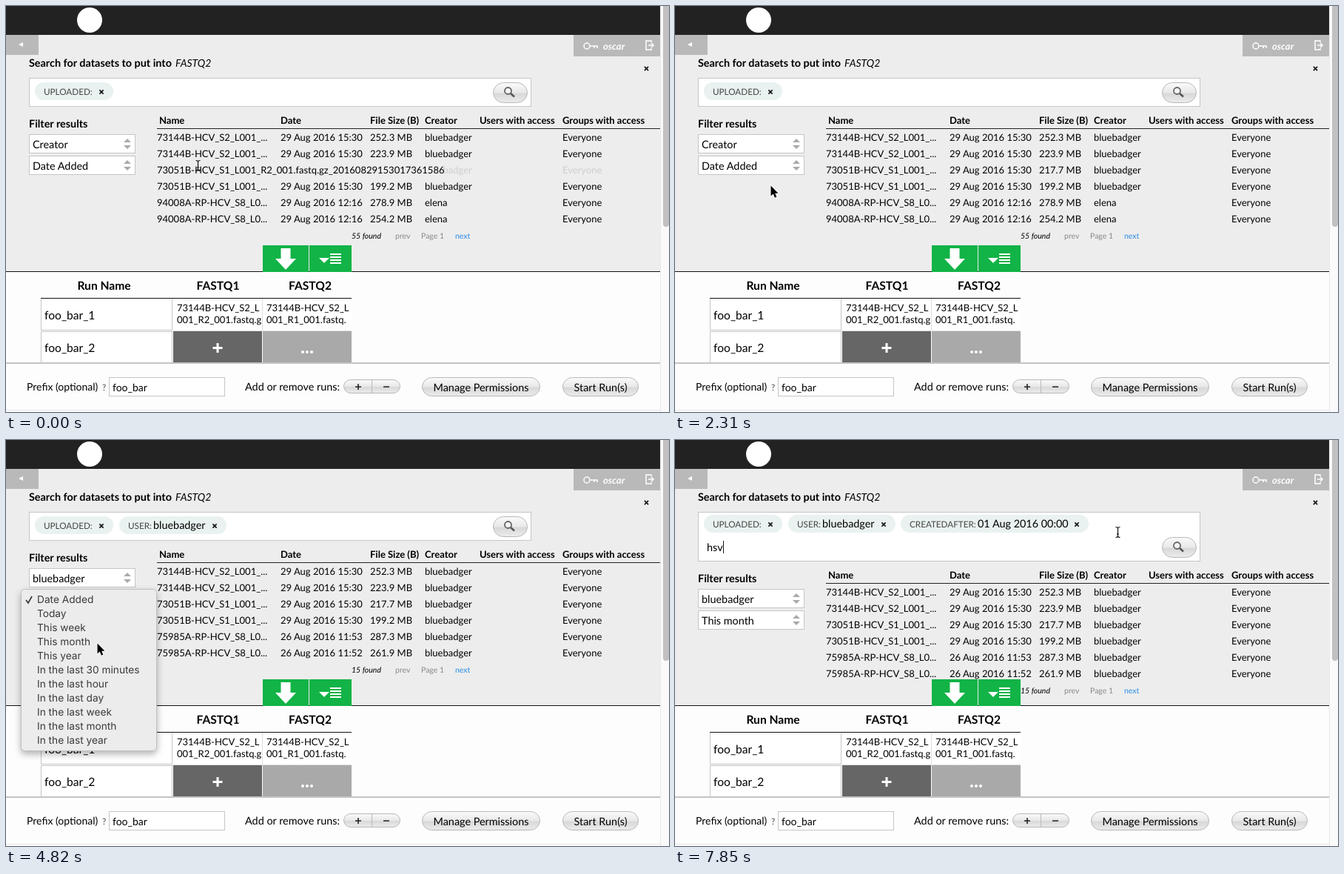
An HTML page that plays this animation: 896 by 548 pixels, repeating every 8 s.

```html
<!DOCTYPE html>
<html lang="en">
<head>
<meta charset="utf-8">
<title>Dataset search</title>
<style>
html, body { margin: 0; width: 100%; height: 100%; overflow: hidden; background: #fdfdfd; }
svg { display: block; position: absolute; left: 0; top: 0; }
text { font-family: Lato, sans-serif; font-size: 13px; white-space: pre; text-rendering: geometricPrecision; }
.mid { font-size: 14.4px; }
.big { font-size: 15.6px; }
.bold { font-weight: 700; }
.it { font-style: italic; }
.input { font-size: 14px; }
.tag { font-size: 11.7px; fill: #444; }
.small { font-size: 10.5px; }
.gray { fill: #888; }
.white { fill: #fff; }
.center { text-anchor: middle; }
.menu text { font-family: Inter, sans-serif; font-size: 13.7px; fill: #3a3a3a; }
.menu text.on { fill: #fff; }
.menu > rect:first-child { filter: drop-shadow(0 4px 5px rgba(0, 0, 0, .3)); }
</style>
</head>
<body>
<svg width="896" height="548" viewBox="0 0 896 548">
  <defs>
    <linearGradient id="pill" x2="0" y2="1">
      <stop stop-color="#fafafa"/><stop offset=".5" stop-color="#e8e8e8"/>
      <stop offset=".55" stop-color="#d8d8d8"/><stop offset="1" stop-color="#ececec"/>
    </linearGradient>
  </defs>
  <g id="scene"></g>
  <g id="cursor">
    <path id="arrow" d="M0 0V14L3.2 11 5.4 16.2 7.8 15.2 5.7 10.2H10Z" stroke="#fff" stroke-width="1.8" paint-order="stroke"/>
    <path id="beam" d="M-3-7Q0-7 0-5Q0-7 3-7M0-5V5M-3 7Q0 7 0 5Q0 7 3 7M-1.5 2.5H1.5" fill="none" stroke="#111" stroke-width="1.2"/>
  </g>
</svg>
<script>
const LOOP = 8000, PANEL = '#ededed';
const USER = 'bluebadger', OTHER = 'elena';
const byId = id => document.getElementById(id);

const text = (x, y, s, cls = '', more = '') => `<text x="${x}" y="${y}" class="${cls}" ${more}>${s}</text>`;
const rect = (x, y, w, h, fill, more = '') => `<rect x="${x}" y="${y}" width="${w}" height="${h}" fill="${fill}" ${more}/>`;
const path = (d, fill, more = '') => `<path d="${d}" fill="${fill}" ${more}/>`;
const field = (x, y, w, h) => rect(x + .5, y + .5, w - 1, h - 1, '#fff', 'stroke="#c6c6c6"');
const pill = (x, y, w, h) => rect(x + .5, y + .5, w - 1, h - 1, 'url(#pill)', `rx="${h / 2}" stroke="#b8b8b8"`);
const cross = (x, y, r = 2.6) => path(`M${x - r} ${y - r}l${2 * r} ${2 * r}m0 ${-2 * r}l${-2 * r} ${2 * r}`, 'none', 'stroke="#111" stroke-width="1.6"');

const commonRows = [
  ['73144B-HCV_S2_L001_', 'R2_001.fastq.gz_20160829153027260734', '29 Aug 2016 15:30', '252.3 MB', USER],
  ['73144B-HCV_S2_L001_', 'R1_001.fastq.gz_20160829153027169461', '29 Aug 2016 15:30', '223.9 MB', USER],
  ['73051B-HCV_S1_L001_', 'R2_001.fastq.gz_20160829153017361586', '29 Aug 2016 15:30', '217.7 MB', USER],
  ['73051B-HCV_S1_L001_', 'R1_001.fastq.gz_20160829153017270812', '29 Aug 2016 15:30', '199.2 MB', USER]];
const allRows = [...commonRows,
  ['94008A-RP-HCV_S8_L0', '', '29 Aug 2016 12:16', '278.9 MB', OTHER],
  ['94008A-RP-HCV_S8_L0', '', '29 Aug 2016 12:16', '254.2 MB', OTHER]];
const userRows = [...commonRows,
  ['75985A-RP-HCV_S8_L0', '', '26 Aug 2016 11:53', '287.3 MB', USER],
  ['75985A-RP-HCV_S8_L0', '', '26 Aug 2016 11:52', '261.9 MB', USER]];

const creators = ['Creator', 'adela', 'bertil', USER, 'data_uploader', OTHER, 'oscar'];
const dates = ['Date Added', 'Today', 'This week', 'This month', 'This year',
  ...['30 minutes', 'hour', 'day', 'week', 'month', 'year'].map(s => 'In the last ' + s)];

// Pointer path: time, x, y
const route = [[0, 259, 215], [59.9, 259, 215], [60, 267, 219], [260, 267, 219], [500, 235, 200],
  [760, 185, 173], [1020, 130, 183], [1260, 130, 183], [1720, 129, 242], [2730, 129, 242],
  [2950, 118, 209], [3550, 118, 209], [4280, 123, 274], [5060, 123, 274], [5340, 338, 203],
  [5580, 517, 116], [5810, 583, 129], [6290, 583, 129], [6450, 603, 116], [6710, 598, 124], [LOOP, 598, 124]];

function pointer(t) {
  const i = Math.max(1, route.findIndex(p => p[0] > t));
  const [t0, x0, y0] = route[i - 1], [t1, x1, y1] = route[i];
  const k = Math.max(0, (t - t0) / (t1 - t0));
  return [x0 + (x1 - x0) * k, y0 + (y1 - y0) * k];
}

function header() {
  return rect(0, 0, 884, 39, '#222') + '<circle cx="113" cy="19" r="17" fill="#fff"/>' +
    rect(0, 39, 884, 319, PANEL) +
    rect(0, 39, 44, 27, '#b9b9b9') + path('M17 52l6-3v6Z', '#fff') +
    rect(767, 39, 117, 29, '#b9b9b9') +
    path('M789 54a4 4 0 1 0-8 0a4 4 0 1 0 8 0H799V57M795 54V57', 'none', 'stroke="#fff" stroke-width="1.5"') +
    text(807, 59, 'oscar', 'it bold white') +
    path('M872 49V47H865V59H872V57M868 53H875M872 50L875 53L872 56', 'none', 'stroke="#fff" stroke-width="1.5"') +
    text(31, 82, 'Search for datasets to put into', 'mid bold') +
    text(229, 82, 'FASTQ2', 'it input') + cross(865.5, 84.5);
}

function searchBox(s) {
  const y = s.wide ? 102 : 104;
  const tag = (x, w, label, value = '', valueX = 0) =>
    rect(x, y - 1, w, 24, '#e9f2f0', 'rx="12"') + text(x + 12, y + 16, label, 'tag') +
    text(valueX, y + 16, value, 'mid') + cross(x + w - 16, y + 12);
  return field(31, 97, 679, 39 + s.dy) + tag(39, 106, 'UPLOADED:') +
    (s.tagged ? tag(153, 145, 'USER:', USER, 199) : '') +
    (s.wide ? tag(305, 254, 'CREATEDAFTER:', '01 Aug 2016 00:00', 409) : '') +
    `<g transform="translate(0 ${s.dy})">` + pill(658, 103, 47, 28) +
    path('M682 118L687 122.5', 'none', 'stroke="#555" stroke-width="2.6"') +
    '<circle cx="678.5" cy="114.5" r="4.5" fill="#f4f4f4" stroke="#666" stroke-width="1.8"/></g>' +
    (s.typed ? text(43, 150, s.typed, 'mid') : '') +
    (s.caret ? rect(s.caret, 136, 1, 17, '#111') : '');
}

function select(y, value) {
  return field(31, y, 144, 26) + text(36, y + 19, value, 'mid') +
    path(`M159 ${y + 11}l5-5 5 5ZM159 ${y + 15}l5 5 5-5Z`, '#aaa');
}

function results(s) {
  const heads = [[207, 'Name'], [371, 'Date'], [492, 'File Size (B)'], [566, 'Creator'],
    [640, 'Users with access'], [752, 'Groups with access']];
  const row = ([name, rest, date, size, user], i) => {
    const y = 182 + 22 * i, open = i === s.hover;
    const cells = text(371, y, date) + text(492, y, size) + text(566, y, user) + text(752, y, 'Everyone');
    return `<g opacity="${open ? .13 : 1}">${cells}</g>` +
      (open ? rect(204, y - 15, 387, 21, PANEL) : '') + text(204, y, name + (open ? rest : '...'));
  };
  return `<g transform="translate(0 ${s.dy})">` +
    text(31, 164, 'Filter results', 'mid bold') +
    select(173, s.picked ? USER : 'Creator') + select(202, s.wide ? 'This month' : 'Date Added') +
    heads.map(([x, label]) => text(x, 159, label, 'bold')).join('') + rect(204, 165, 680, 1, '#222') +
    (s.filtered ? userRows : allRows).map(row).join('') +
    text(467, 314, (s.filtered ? 15 : 55) + ' found', 'small it') + text(526, 314, 'prev', 'small gray') +
    text(561, 314, 'Page 1', 'small gray') + text(607, 314, 'next', 'small', 'fill="#2a8ce6"') + '</g>';
}

function runs() {
  const line = 'stroke="#fff" stroke-width="2"';
  const file = (x, part, end) => text(x, 412, '73144B-HCV_S2_L') + text(x, 428, `001_${part}_001.fastq.${end}`);
  return rect(0, 359, 884, 189, '#fdfdfd') + rect(0, 358, 884, 1, '#111') +
    rect(347, 323, 62, 36, '#12b347') + rect(410, 323, 57, 36, '#12b347') +
    path('M371.5 327H384.5V341H392L378 356L364 341H371.5Z', '#fff') +
    path('M423 340H437L430 347Z', '#fff') + path('M438 335H453M438 339H453M438 343H453M438 347H453', 'none', line) +
    text(132.5, 383, 'Run Name', 'big bold center') + text(286.5, 383, 'FASTQ1', 'big bold center') +
    text(411, 383, 'FASTQ2', 'big bold center') +
    field(47, 394, 178, 44) + field(47, 439, 178, 44) +
    rect(225, 395, 242, 43, '#fff') + rect(346, 395, 1, 43, '#ddd') + rect(225, 438, 242, 1, '#ddd') +
    rect(47, 394, 420, 1, '#111') +
    text(52, 423, 'foo_bar_1', 'big') + text(52, 467, 'foo_bar_2', 'big') +
    file(231, 'R2', 'g') + file(352, 'R1', '') +
    rect(226, 439, 120, 43, '#666') + rect(347, 439, 120, 43, '#a9a9a9') +
    path('M279.5 461.5H292.5M286 455V468', 'none', 'stroke="#fff" stroke-width="3"') +
    [401, 407, 413].map(x => `<circle cx="${x}" cy="467" r="2" fill="#fff"/>`).join('');
}

function footer() {
  return rect(0, 481, 884, 2, '#c4c4c4') + rect(0, 483, 884, 62, '#fdfdfd') + rect(0, 545, 884, 1, '#e6e6e6') +
    text(28, 519, 'Prefix (optional)', 'input') + text(130, 519, '?', 'tag') +
    field(139, 501, 157, 26) + text(144, 520, 'foo_bar', 'input') +
    text(323, 519, 'Add or remove runs:', 'mid') +
    pill(456, 504, 77, 19) + rect(494, 505, 1, 17, '#b8b8b8') +
    path('M472 514H480M476 510V518M510 514H518', 'none', 'stroke="#222" stroke-width="1.6"') +
    pill(562, 501, 160, 26) + text(642, 520, 'Manage Permissions', 'mid center') +
    pill(752, 501, 103, 26) + text(803.5, 520, 'Start Run(s)', 'mid center') +
    rect(884, 0, 12, 548, '#fafafa') + rect(884, 0, 1, 548, '#e8e8e8') + rect(888, -6, 8, 304, '#c1c1c1', 'rx="4"');
}

function menu({ y, w, items, on, opacity }) {
  const list = items.map((s, i) => (i === on ? rect(21, y + 4 + 19 * i, w, 19, '#a2a2a2') : '') +
    text(42, y + 18 + 19 * i, s, i === on ? 'on' : '')).join('');
  return `<g class="menu" opacity="${opacity}">` +
    rect(20.5, y - .5, w + 1, items.length * 19 + 9, '#ececec', 'rx="5" stroke="#c0c0c0"') + list +
    path(`M27 ${y + 14}l3 4 5-9`, 'none', `stroke="${on ? '#333' : '#fff'}" stroke-width="1.6"`) + '</g>';
}

// An open menu blinks its chosen item, then fades.
function openMenu(t, opened, chosen, y, w, items) {
  const closing = chosen + 120;
  if (t < opened || t >= closing + 120) return null;
  const blink = t >= chosen && t < chosen + 60;
  const on = blink ? -1 : Math.floor((pointer(t)[1] - y - 4) / 19);
  return { y, w, items, on, opacity: t < closing ? 1 : 1 - (t - closing) / 120 };
}

function stateAt(t) {
  const wide = t >= 5120, dy = wide ? 28 : 0;
  const [hx, hy] = pointer(Math.max(0, t - 60));
  const typed = 'hsv'.slice(0, t < 7490 ? 0 : t < 7670 ? 1 : t < 7850 ? 2 : 3);
  const caretOn = t >= 6050 && t < 6550 || t >= 7070;
  return {
    wide, dy, typed,
    picked: t >= 2370, tagged: t >= 2430, filtered: t >= 2550,
    hover: hx > 204 ? Math.floor((hy - 166 - dy) / 22) : -1,
    caret: caretOn && [43, 51, 58, 65][typed.length],
    menu: openMenu(t, 1080, 2020, 174, 144, creators) || openMenu(t, 3250, 4820, 202, 182, dates)
  };
}

const head = header(), bottom = runs() + footer();
let last = '', start;

function draw(now) {
  start ??= now;
  const t = (now - start) % LOOP;
  const s = stateAt(t), key = JSON.stringify(s);
  if (key !== last) {
    byId('scene').innerHTML = head + searchBox(s) + results(s) + bottom + (s.menu ? menu(s.menu) : '');
    last = key;
  }
  const [x, y] = pointer(t), overText = x > 204;
  byId('cursor').setAttribute('transform', `translate(${x + .5} ${y + .5})`);
  byId('arrow').style.display = overText ? 'none' : '';
  byId('beam').style.display = overText ? '' : 'none';
  requestAnimationFrame(draw);
}
requestAnimationFrame(draw);
</script>
</body>
</html>
```
